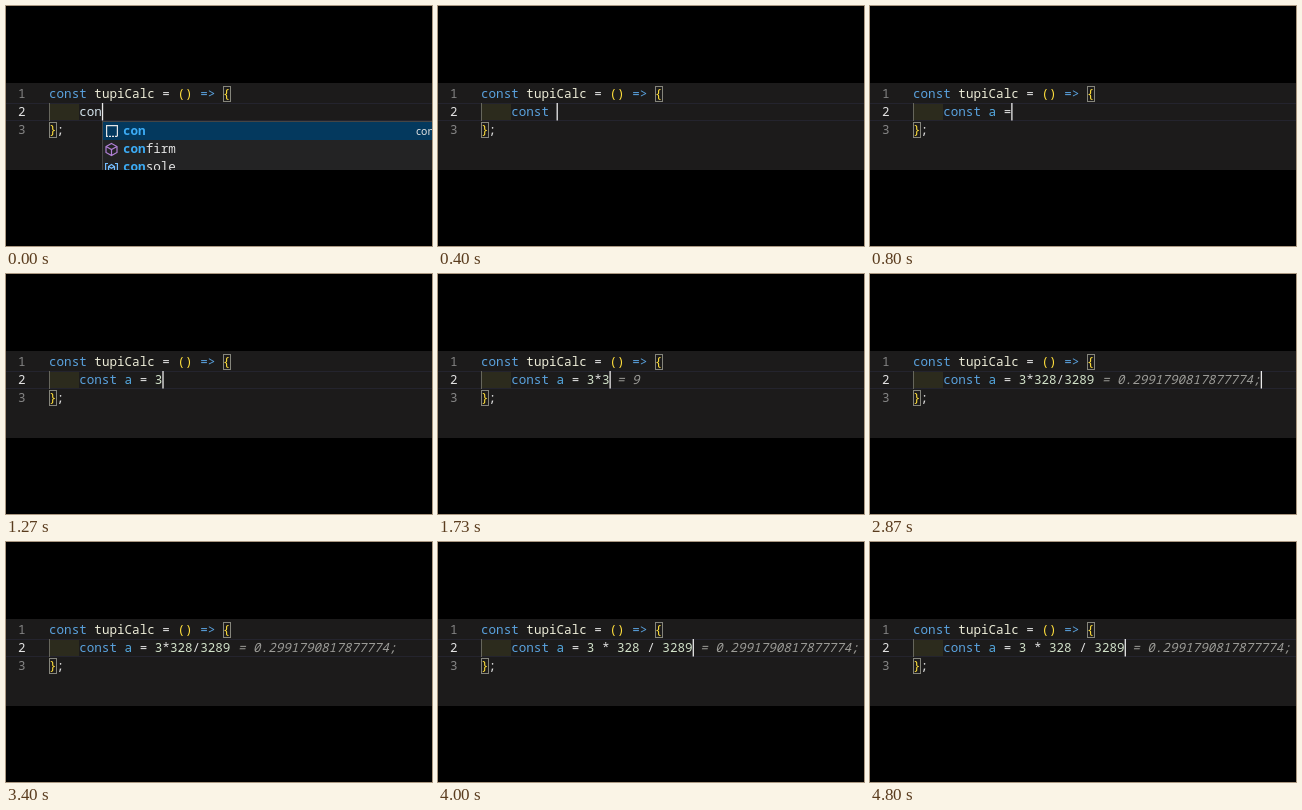
Animation of 426 by 240 pixels, one loop 4.87 s. Source, as an HTML page:

```html
<!DOCTYPE html>
<html lang="en">
<head>
<meta charset="utf-8">
<title>Inline calculation in a code editor</title>
<style>
  html, body { margin: 0; width: 100%; height: 100%; overflow: hidden; background: #000; }
  svg { display: block; width: 100vw; height: 100vh; }
  text { font: 500 12.6px "Noto Sans Mono", "DejaVu Sans Mono", monospace; white-space: pre; fill: #e2e2e2; }
  .num { fill: #858585; }
  .key { fill: #5aa2de; }
  .fn { fill: #ececd8; }
  .bracket { fill: #ffdf3c; }
  .name { fill: #d2e2ea; }
  .var { fill: #55aae2; }
  .digit { fill: #d2e2ca; }
  .ghost { fill: #9c9c98; font-style: italic; }
  .hit { fill: #3cacf6; font-weight: 700; }
  .detail { font: 10.5px "Noto Sans", sans-serif; }
  .match { fill: none; stroke: #85857c; }
</style>
</head>
<body>
<svg viewBox="0 0 426 240">
  <defs><clipPath id="editor"><rect y="77" width="426" height="87"/></clipPath></defs>
  <rect width="426" height="240" fill="#000"/>
  <g clip-path="url(#editor)">
    <rect y="77" width="426" height="87" fill="#1c1b1b"/>
    <path d="M0 97.5H426M0 114.5H426" stroke="#24242e"/>
    <rect x="43" y="98" width="30" height="16" fill="#ffff40" opacity=".07"/>
    <path d="M43.5 97V115" stroke="#66665c"/>
    <rect class="match" x="217.5" y="80.5" width="7" height="15"/>
    <rect class="match" x="43.5" y="116.5" width="7" height="15"/>
    <text class="num" x="12" y="92">1</text>
    <text x="12" y="110.2">2</text>
    <text class="num" x="12" y="128.4">3</text>
    <text x="43" y="92"><tspan class="key">const</tspan> <tspan class="fn">tupiCalc</tspan> = <tspan class="bracket">()</tspan> <tspan class="key">=&gt;</tspan> <tspan class="bracket">{</tspan></text>
    <text x="43" y="128.4"><tspan class="bracket">}</tspan>;</text>
    <text id="code" x="73.2" y="110.2"></text>
    <rect id="caret" y="97" width="1.3" height="17.5" fill="#e8e8e8"/>
    <g id="popup">
      <rect x="96.5" y="115.5" width="340" height="60" fill="#232324" stroke="#454545"/>
      <rect x="97" y="116" width="330" height="18" fill="#04395e"/>
      <g fill="none" stroke-width="1.2">
        <path d="M100.6 130.4V119.6H111.4V130.4" stroke="#e4e4e4"/>
        <path d="M100 130.4H112" stroke="#e4e4e4" stroke-dasharray="2 1"/>
        <path d="M105.5 137.5L111 140.5V146.5L105.5 149.5L100 146.5V140.5ZM100 140.5L105.5 143.5L111 140.5M105.5 143.5V149.5" stroke="#b180d7"/>
        <path d="M102 157.5H99.6V167M109 157.5H111.4V167M105.5 158.5L108.5 160.5V164L105.5 166L102.5 164V160.5ZM102.5 160.5L105.5 162.3L108.5 160.5" stroke="#75beff"/>
      </g>
      <text class="item" x="117" y="129.2"></text>
      <text class="item" x="117" y="147.2"></text>
      <text class="item" x="117" y="165.2"></text>
      <text class="detail" x="410" y="129">const</text>
    </g>
  </g>
</svg>
<script>
const LOOP = 4870, BLINK = 500, CHAR = 7.56, LEFT = 73.2;
const QUOTIENT = ' = 0.2991790817877774';

// time, code, result hint, text after the hint, caret column (default: line end)
const steps = [
  [0, 'con'],
  [133, 'cons'],
  [200, 'const'],
  [333, 'const '],
  [467, 'const a'],
  [600, 'const a '],
  [733, 'const a ='],
  [933, 'const a = '],
  [1130, 'const a = 3'],
  [1400, 'const a = 3*'],
  [1667, 'const a = 3*3', ' = 9', '', 13],
  [1933, 'const a = 3*3', ' = 9', '2'],
  [2000, 'const a = 3*32', ' = 96', '', 14],
  [2067, 'const a = 3*32', ' = 96', '8'],
  [2133, 'const a = 3*328', ' = 984', '', 15],
  [2270, 'const a = 3*328', ' = 984', '/'],
  [2380, 'const a = 3*328/'],
  [2467, 'const a = 3*328/3', ' = 328', '', 17],
  [2600, 'const a = 3*328/32', ' = 30.75', '', 18],
  [2667, 'const a = 3*328/328', ' = 3', '', 19],
  [2733, 'const a = 3*328/3289', QUOTIENT, '', 20],
  [2867, 'const a = 3*328/3289', QUOTIENT, ';'],
  [3733, 'const a = 3 * 328 / 3289', QUOTIENT, ';', 24]
];

const menus = {
  con: ['con', 'confirm', 'console'],
  cons: ['const', 'console', 'constructor'],
  const: ['const', 'constructor', 'constant']
};

const $ = id => document.getElementById(id);
const items = document.querySelectorAll('.item');

function span(text, cls) {
  const el = document.createElementNS('http://www.w3.org/2000/svg', 'tspan');
  el.textContent = text;
  if (cls) el.setAttribute('class', cls);
  return el;
}

function tokenClass(token) {
  if (token === 'const') return 'key';
  if (token === 'a') return 'var';
  if (/\d/.test(token)) return 'digit';
  return /\w/.test(token) ? 'name' : '';
}

function show([, code, hint = '', tail = '', column]) {
  const parts = code.match(/\w+|\W+/g).map(t => span(t, tokenClass(t)));
  if (hint) parts.push(span(hint, 'ghost'));
  if (tail) parts.push(span(tail, tail === ';' ? 'ghost' : ''));
  $('code').replaceChildren(...parts);

  const col = column ?? (code + hint + tail).length;
  $('caret').setAttribute('x', LEFT + col * CHAR);

  const menu = menus[code];
  $('popup').style.display = menu ? '' : 'none';
  if (menu) {
    items.forEach((el, i) => el.replaceChildren(
      span(menu[i].slice(0, code.length), 'hit'), span(menu[i].slice(code.length))));
  }
}

let current;
const start = performance.now();

function draw(now) {
  const t = Math.max(0, now - start) % LOOP;
  const step = steps.findLast(s => s[0] <= t);
  if (step !== current) show(current = step);
  $('caret').style.opacity = (t - step[0]) % (2 * BLINK) < BLINK ? 1 : 0;
  requestAnimationFrame(draw);
}
draw(start);
</script>
</body>
</html>
```
